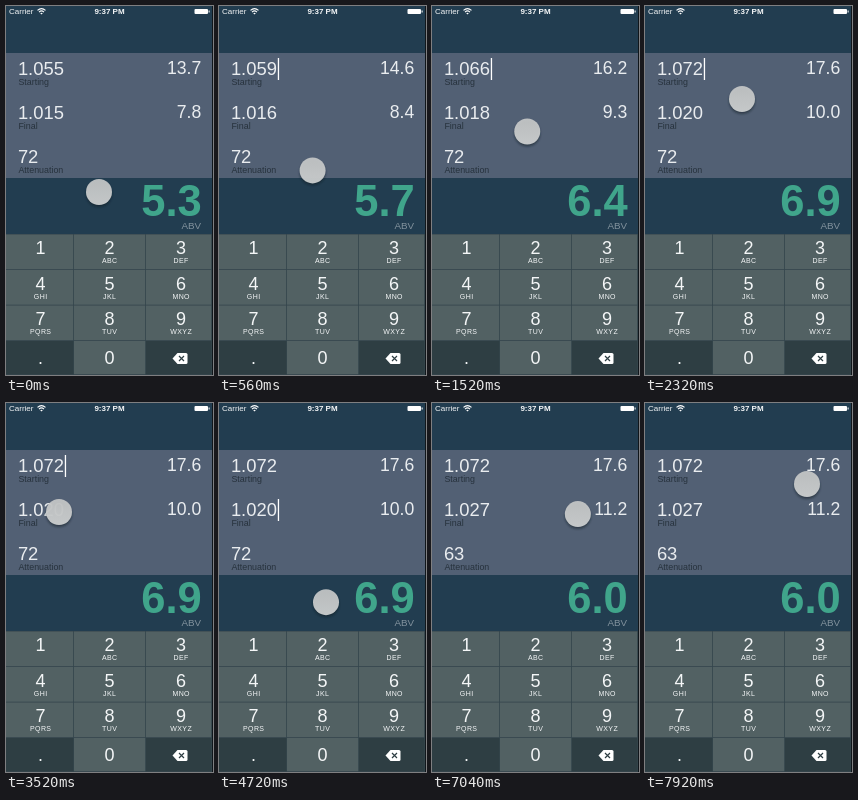
Animation of 207 by 369 pixels, one loop 8000 ms. Source, as an HTML page:

```html
<!DOCTYPE html>
<html lang="en">
<head>
<meta charset="utf-8">
<title>ABV calculator</title>
<style>
  html, body { margin: 0; width: 100%; height: 100%; overflow: hidden; background: #223d50; }
  svg { display: block; width: 100%; height: 100%; }
  text { font-family: "Liberation Sans", Arial, sans-serif; fill: #f4f6f7; }
  .value { font-size: 18.4px; fill: #e9ecef; }
  .result { font-size: 17.6px; fill: #e9ecef; }
  .label { font-size: 8.9px; fill: #27323d; }
  .right { text-anchor: end; }
  .mid { text-anchor: middle; }
  .abv { font-size: 43.5px; font-weight: bold; fill: #40a58b; }
  .unit { font-size: 9.8px; fill: #82929d; }
  .digit { font-size: 18px; }
  .letters { font-size: 7px; letter-spacing: .4px; }
  .status { font-size: 8px; }
  .bold { font-weight: bold; }
</style>
</head>
<body>
<svg id="stage" viewBox="0 0 207 369" preserveAspectRatio="none">
  <defs>
    <linearGradient id="metal" x1="0" y1="0" x2="0" y2="1">
      <stop offset="0" stop-color="#c6c8c8"/>
      <stop offset="1" stop-color="#d2d4d4"/>
    </linearGradient>
    <filter id="soft" x="-50%" y="-50%" width="200%" height="200%">
      <feGaussianBlur stdDeviation="1.3"/>
    </filter>
  </defs>
  <rect width="207" height="369" fill="#223d50"/>
  <rect y="47" width="207" height="125" fill="#526074"/>

  <text class="status" x="3" y="8.3">Carrier</text>
  <g fill="none" stroke="#fff" stroke-width="1.1">
    <path d="M31.5 4.4Q35.5 .8 39.5 4.4M33 6.1Q35.5 3.8 38 6.1"/>
    <path d="M35.5 8.6L34.2 7.2Q35.5 6.2 36.8 7.2Z" fill="#fff" stroke="none"/>
  </g>
  <text class="status bold mid" x="103.5" y="8.3">9:37 PM</text>
  <rect x="188.5" y="3" width="13.5" height="5" rx="1" fill="#fff"/>
  <rect x="202.6" y="4.5" width="1" height="2" fill="#fff"/>

  <g id="rows"></g>
  <text id="abv" class="abv right" x="195.7" y="210.4"></text>
  <text class="unit right" x="195" y="222.8">ABV</text>
  <g id="pad"></g>
  <rect id="caret" x="58.8" width="1.3" height="22" fill="#fff"/>
  <rect x="206" width="1" height="369" fill="#10161b"/>
  <g id="knob">
    <circle cy="2" r="13" fill="#101a22" opacity=".5" filter="url(#soft)"/>
    <circle r="13" fill="url(#metal)" opacity=".92"/>
  </g>
</svg>
<script>
const $ = id => document.getElementById(id);
const LOOP = 8000;

function add(parent, tag, attrs, text = '') {
  const el = document.createElementNS('http://www.w3.org/2000/svg', tag);
  for (const k in attrs) el.setAttribute(k, attrs[k]);
  el.textContent = text;
  return parent.appendChild(el);
}

const rows = ['Starting', 'Final', 'Attenuation'].map((name, i) => {
  const y = 69 + i * 44;
  add($('rows'), 'text', { class: 'label', x: 12.4, y: y + 10 }, name);
  return {
    left: add($('rows'), 'text', { class: 'value', x: 11.9, y }),
    right: add($('rows'), 'text', { class: 'result right', x: 195.3, y: y - .8 })
  };
});

// Keypad
const colX = [0, 68, 140, 206], rowY = [228.5, 264, 299.5, 335, 369];
const keys = ['1', '2 ABC', '3 DEF', '4 GHI', '5 JKL', '6 MNO',
  '7 PQRS', '8 TUV', '9 WXYZ', '.', '0', ''];
add($('pad'), 'rect', { y: 228, width: 207, height: 141, fill: '#34454c' });
keys.forEach((key, i) => {
  const c = i % 3, r = Math.floor(i / 3), x = colX[c], y = rowY[r];
  const [digit, letters] = key.split(' ');
  const mid = [34.5, 103.5, 175][c];
  add($('pad'), 'rect', {
    x, y, width: colX[c + 1] - x - .8, height: rowY[r + 1] - y - .8,
    fill: r == 3 && c != 1 ? '#2e3e43' : '#526163'
  });
  add($('pad'), 'text', { class: 'digit mid', x: mid, y: y + (r == 3 ? 23.2 : 19.5) }, digit);
  if (letters) add($('pad'), 'text', { class: 'letters mid', x: mid + .2, y: y + 28.8 }, letters);
});
add($('pad'), 'path', { d: 'M166.5 352.5L171.5 347H180Q181.5 347 181.5 348.5V356.5Q181.5 358 180 358H171.5Z', fill: '#fff' });
add($('pad'), 'path', { d: 'M173 350L178 355M178 350L173 355', stroke: '#2e3e43', 'stroke-width': 1.2 });

// Piecewise linear lookup: points are [input, ...outputs]
function along(points, v) {
  const i = points.findIndex(p => p[0] > v);
  if (i == 0) return points[0].slice(1);
  if (i < 0) return points[points.length - 1].slice(1);
  const a = points[i - 1], b = points[i], k = (v - a[0]) / (b[0] - a[0]);
  return a.slice(1).map((n, j) => n + (b[j + 1] - n) * k);
}

const path = [
  [0, 93, 186], [960, 94, 149], [2300, 97, 93], [2640, 97, 93],
  [3520, 53, 109], [4000, 53, 109], [4720, 107, 199], [4880, 108, 228],
  [5040, 108, 228], [5760, 107, 179], [6000, 107, 179], [6300, 107, 168],
  [7120, 150, 105], [7440, 150, 105], [7920, 162, 81]
];
const finalBrix = [[55, 7.8], [62, 8.8], [72, 10]];
const dragY = (t, from, to) => along(path, Math.min(Math.max(t, from), to))[1];
const gravity = n => '1.' + String(n).padStart(3, '0');

function caretOn(t) {
  if (t < 80) return false;
  if (t < 2300 || (t > 5040 && t < 6300)) return true;
  const since = t < 4160 ? 2300 : t < 5040 ? 4160 : 6300;
  return (t - since) % 1000 < 600;
}

function draw(t) {
  const [x, y] = along(path, t);
  const start = Math.round(55 + (186 - dragY(t, 0, 2300)) / 5.47);
  const raise = t < 5040 ? 0 : Math.max(0, Math.round((206 - dragY(t, 5040, 6300)) / 5.4));
  const end = Math.round(start * .2775) + raise;
  const atten = raise ? Math.round((start - end) / start * 100) : 72;

  rows[0].left.textContent = gravity(start);
  rows[0].right.textContent = (13.7 + .2294 * (start - 55)).toFixed(1);
  rows[1].left.textContent = gravity(end);
  rows[1].right.textContent = (along(finalBrix, start)[0] + .172 * raise).toFixed(1);
  rows[2].left.textContent = atten;
  $('abv').textContent = (.1327 * (start - end)).toFixed(1);

  $('caret').setAttribute('y', t < 4160 ? 52 : 96);
  $('caret').setAttribute('opacity', caretOn(t) ? 1 : 0);
  $('knob').setAttribute('transform', `translate(${x} ${y})`);
}

const began = performance.now();
function tick() {
  draw((performance.now() - began) % LOOP);
  requestAnimationFrame(tick);
}
tick();
</script>
</body>
</html>
```
